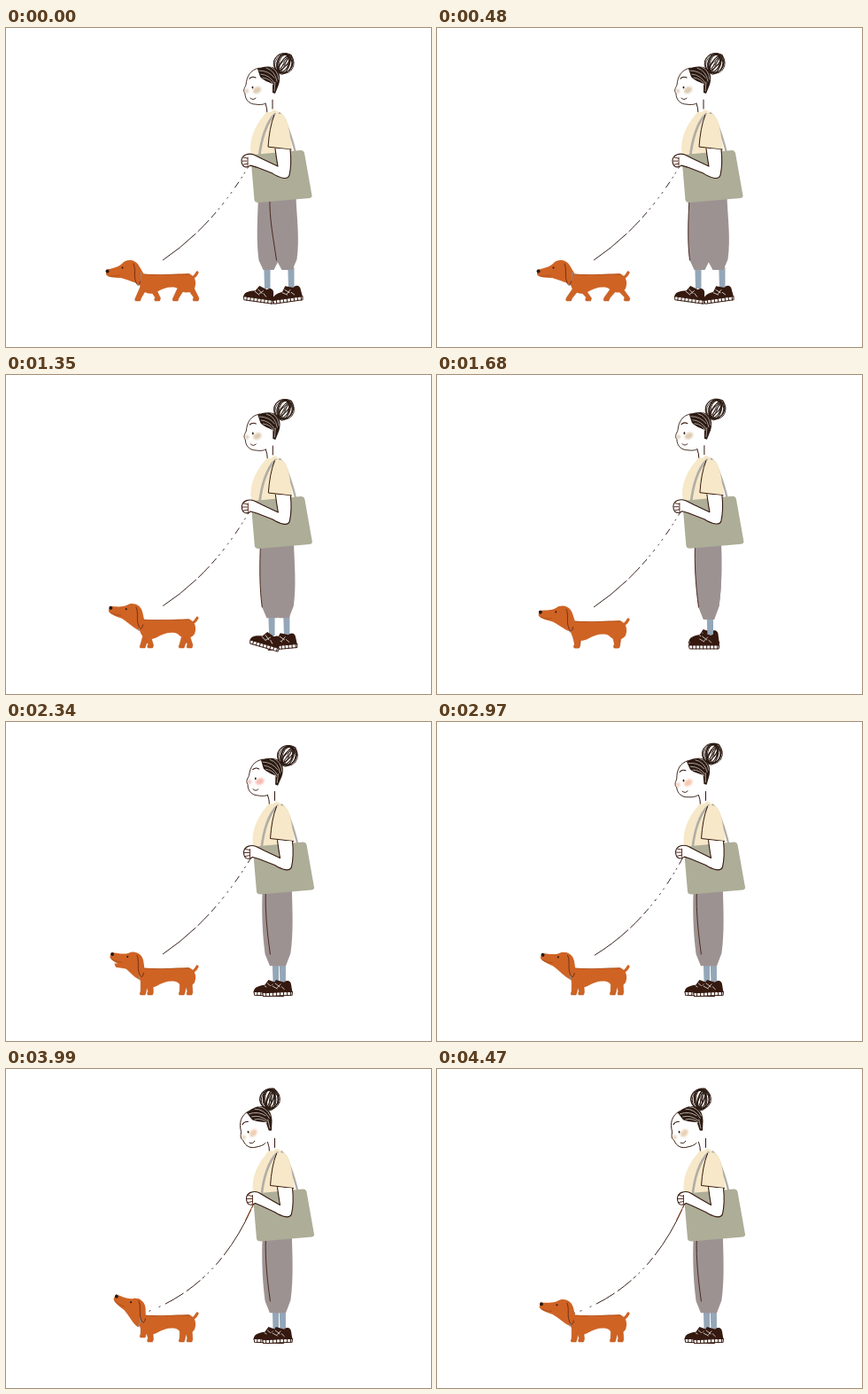
An HTML page with a canvas that plays this animation: 480 by 360 pixels, repeating every 4.5 s.

```html
<!DOCTYPE html>
<html lang="en">
<head>
<meta charset="utf-8">
<title>Walking the dog</title>
<style>
html, body { margin: 0; width: 100%; height: 100%; overflow: hidden; background: #fff; }
canvas { display: block; }
</style>
</head>
<body>
<canvas id="stage" width="480" height="360"></canvas>
<script>
const ctx = document.getElementById('stage').getContext('2d');
const LOOP = 4500, TICK = 30, STRIDE = 960, STOP = 1750;
const INK = '#35190f', HAIR = '#2b1a12', SKIN = '#fff', SHIRT = '#f6e8c8', BAG = '#adad98',
  STRAP = '#b1ada7', PANTS = '#9d9292', SOCK = '#94a7b8', FUR = '#cf6324', FUR_INK = '#6b2a10';

const lerp = (a, b, k) => a + (b - a) * k;
const ease = (t, from, to) => {
  const k = Math.min(1, Math.max(0, (t - from) / (to - from)));
  return k * k * (3 - 2 * k);
};
// Eased value through [time, value] pairs
function keyed(t, keys) {
  let value = keys[0][1];
  for (let i = 1; i < keys.length; i++)
    value = lerp(value, keys[i][1], ease(t, keys[i - 1][0], keys[i][0]));
  return value;
}
function shape(path, fill, stroke, width = 1) {
  const p = new Path2D(path);
  if (fill) { ctx.fillStyle = fill; ctx.fill(p); }
  if (stroke) { ctx.strokeStyle = stroke; ctx.lineWidth = width; ctx.stroke(p); }
}
const line = (path, color = INK, width = 1) => shape(path, null, color, width);
function oval(x, y, rx, ry, fill, angle = 0) {
  ctx.beginPath();
  ctx.ellipse(x, y, rx, ry, angle, 0, 7);
  ctx.fillStyle = fill;
  ctx.fill();
}
function group(x, y, degrees, px, py, draw) {
  ctx.save();
  ctx.translate(px + x, py + y);
  ctx.rotate(degrees * Math.PI / 180);
  ctx.translate(-px, -py);
  draw();
  ctx.restore();
}

function shoe(x, y, degrees) {
  group(x, y, degrees, 0, 0, () => {
    shape('M-17-3C-18-9-11-11-5-12L-1-18L8-15C11-18 16-17 16-11L17-3Z', INK);
    shape('M-17-4L17-4L16.5 0L-16 0Z', SKIN, INK);
    for (let i = -13; i < 16; i += 4) line(`M${i}-4V0`);
    line('M-5-11L0-8M-2-14L3-10M4-13L0-9M5-10L8-7', '#e9e2dc', .8);
  });
}

// d: -1 leg in front, +1 leg behind
function leg(d, lift, seam) {
  const hip = 306 + 6.5 * d, knee = 307 + 10 * d, hem = 307 + 10.5 * d, y = 276 - 3 * Math.abs(d);
  const ankle = 308.5 + 13.5 * d;
  shape(`M${ankle - 3.7} ${y - 3}L${ankle - 3} 294H${ankle + 3.5}L${ankle + 3.5} ${y - 3}Z`, SOCK);
  shoe(301.7 + 17 * d, 309 - lift, -8 * d - 12 * lift * d);
  const front = `M${hip - 14.5} 190C${hip - 15.5} 215 ${knee - 14.5} 240 ${knee - 11.5} 262`;
  shape(`${front}L${hem - 6} ${y}H${hem + 6}L${knee + 11.5} 261C${knee + 15} 238 ${hip + 15.5} 210 ${hip + 15} 190Z`, PANTS);
  if (seam) line(front, '#4a2a20');
}

// Loose strands wound around the bun
function bun(x, y) {
  oval(x, y, 11, 11.5, '#fff');
  for (let i = 0; i < 13; i++) {
    ctx.beginPath();
    ctx.ellipse(x + Math.sin(i * 5), y + Math.cos(i * 3), 1 + i * .87, 11.7 - i % 3 * .7, .45 + .3 * Math.sin(i * 7), 0, 7);
    ctx.strokeStyle = HAIR;
    ctx.lineWidth = .9;
    ctx.stroke();
  }
}

function head(blush) {
  shape('M286 45C276 47 272 54 271 64C270 67 267 70 270 74C270 81 275 86 282 86C288 87 294 85 297 80L304 66L300 46Z', SKIN);
  line('M286 45C276 47 272 54 271 64C270 67 267 70 270 74C270 81 275 86 282 86C288 87 291 86 293 85', INK, .9);
  ctx.save();
  ctx.filter = 'blur(1px)';
  oval(283.5, 70, 5, 3.5, blush, -.5);
  oval(272, 71, 2, 2.5, blush);
  ctx.restore();
  line('M275 57Q278 54 282 56', INK, 1.1);
  oval(278.5, 67, .9, 1.4, INK);
  line('M276 79Q279 82 282 79', INK, .9);
  shape('M284 46C290 43 300 42 305 46C310 51 310 58 308 64L304 74L301 73L301 63C296 61 289 58 287 55Z', HAIR);
  line('M286 48Q297 48 303 56M288 52Q298 53 303 62M290 56Q299 57 302 64M294 45Q304 48 306 60M304 61L303 71M299 44Q307 47 308 58', '#d8d0ca', .7);
  bun(314, 40);
}

function torso(tilt, lookUp, blush) {
  shape('M293 82C294 88 295 92 294 97L304 97L302 72Z', SKIN);
  line('M293 85Q295 90 295 96M301 81V91');
  shape('M294 95C286 105 276 118 276 136L278 150H325L323 136C321 120 320 104 312 97L303 92L299 95Z', SHIRT);
  line('M286 146C288 126 294 106 304 97', STRAP, 2.7);
  line('M309 96C317 106 323 124 327 141', STRAP, 2.3);
  shape('M279 143L333 138Q336 138 337 141L345.5 189Q346 191 343 192L285 197Q281 197 280.5 194L276.5 147Q276.5 143 279 143Z', BAG);
  shape('M304 97C299 108 296 120 296 134L322 137C321 118 319 104 311 97Z', SHIRT);
  line('M303 98C299 108 297 120 296 134L322 137');
  const hx = 3 * tilt, hy = -tilt;
  const arm = `M304 136C305 144 306 150 307 156L${290 + hx} 148L${280 + hx} ${143 + hy}`
    + `C${275 + hx} ${141 + hy} ${267 + hx} ${142 + hy} ${266 + hx} ${149 + hy}`
    + `C${266 + hx} ${156 + hy} ${270 + hx} ${159 + hy} ${276 + hx} ${155 + hy}`
    + `L${283 + hx} 157L301 164C309 169 318 172 320 166C322 157 322 146 321 137`;
  shape(arm, SKIN, INK, 1.1);
  line(`M${268 + hx} ${146 + hy}l5 1M${267 + hx} ${150 + hy}l5 0M${268 + hx} ${154 + hy}l5-1M${273 + hx} ${146 + hy}v9`, '#5a2e20');
  group(-tilt, -tilt, 2 * lookUp - 21 * tilt, 298, 90, () => head(blush));
}

function dogLegs(d, paw) {
  const feet = (x, spread, raise) => [1, -1].forEach(side => {
    const foot = x + side * spread, y = 308 - (side < 0 ? raise : 0);
    shape(`M${x + side * 2 - 4.5} 288L${foot - 2.5} ${y - 4}Q${foot - 4.5} ${y} ${foot - 2} ${y}H${foot + 2.5}`
      + `L${foot + 3.5} ${y - 3}L${x + side * 2 + 4.5} 288Z`, FUR, '#b5531b', .5);
  });
  feet(158 + 2 * Math.abs(d), 11 * d, paw);
  feet(203, 11.5 * d, 0);
}

function dog(d, dip, angle, bark, paw) {
  dogLegs(d, paw);
  group(0, dip, 0, 0, 0, () => {
    line('M207 283Q213 282 216 276', FUR, 3.2);
    shape('M150 277C165 279 190 278 206 277C213 279 216 286 213 294C209 300 199 300 194 294'
      + 'C188 291 178 293 170 298C162 302 153 299 151 290Z', FUR);
    line('M153 278C170 279 190 278 207 278', '#a34c1b', .6);
    group(0, 0, angle, 148, 282, () => {
      if (bark > 0) group(0, 0, -18 * bark, 134, 279, () => shape('M120 279L138 277L137 284L122 283Z', FUR));
      shape('M113 273C120 271 127 270 131 266C135 261 145 260 150 268L157 280L154 289'
        + 'C147 289 138 284 130 282C122 282 114 281 113 278Z', FUR);
      oval(114.5, 274.5, 2, 2, HAIR);
      oval(131.5, 270.5, 1, 1.1, HAIR);
      line('M116 280Q123 281 128 279', '#a34c1b', .7);
    });
    line('M153 276Q152 284 150 290', '#8c8b8a', 1.3);
    group(angle * .17, -angle * .12, 0, 0, 0, () => {
      shape('M139 264C147 261 151 270 151.5 279C153 289 149 293 146.5 286C145 279 146 270 139 264Z', FUR);
      line('M144 266C147 272 144 280 146.5 286C148 292 151 291 151.5 286', FUR_INK, .9);
    });
  });
}

const SLACK_DASH = [2, 6, 2, 10, 2, 6, 24, 4, 20, 3, 4, 4, 2, 5, 2, 5, 10, 4, 60];
const TAUT_DASH = [0, 27, 48, 3, 18, 4, 8, 4, 2, 5, 3, 6, 2, 5, 2, 6, 8, 5, 2, 4, 2, 5, 9, 200];
function leash(handX, handY, dip, slack) {
  ctx.setLineDash(slack > .5 ? SLACK_DASH : TAUT_DASH);
  line(`M154 ${276 + dip}Q${lerp(226, 239, slack)} ${lerp(237, 247, slack)} ${handX} ${handY}`, '#2c1710', .95);
  ctx.setLineDash([]);
  if (slack > .5) line(`M${handX} ${handY}l-9 18`, '#9a4a28');
}

function render(t) {
  const phase = Math.min(t, STOP) / STRIDE;
  const stride = Math.abs((phase % 1) * 4 - 2) - 1;
  const swing = (phase % 1) < .5;
  const turn = phase * 4 * Math.PI;
  const stand = ease(t, 1680, 2100);
  const tilt = ease(t, 2800, 3220);

  const bodyX = lerp(.9 * (1 - Math.abs(stride)), 2.5, stand);
  const bodyY = lerp(Math.cos(turn - .8) - .6, -2.5, stand);
  const rgb = [0, 1, 2].map(i => Math.round(keyed(t, [
    [1700, [222, 203, 178][i]], [2300, [247, 186, 178][i]],
    [3300, [247, 203, 178][i]], [4400, [232, 208, 180][i]]])));

  const walkNod = 6 - 6 * Math.cos(turn) - 15 * Math.sin(turn);
  const nod = t < 1680 ? walkNod
    : keyed(t, [[1680, 12], [2100, 23], [2400, 23], [2700, 9], [3260, 35], [4320, 35], [4500, 15]]);
  const dip = t < 1680 ? 2 * Math.sin(turn) : 0;
  const bark = ease(t, 2200, 2300) * (1 - ease(t, 2400, 2500));
  const paw = 5 * ease(t, 3000, 3250) * (1 - ease(t, 4250, 4420));

  ctx.fillStyle = '#fff';
  ctx.fillRect(0, 0, 480, 360);
  ctx.lineCap = ctx.lineJoin = 'round';
  const lift = 4 * (1 - Math.abs(stride)) * (1 - stand);
  leg(-stride, swing ? 0 : lift, false);
  leg(stride, swing ? lift : 0, true);
  ctx.lineCap = 'butt';
  leash(274 + bodyX + 3 * tilt, 156 + bodyY - tilt, dip, tilt);
  ctx.lineCap = 'round';
  group(bodyX, bodyY, 0, 0, 0, () => torso(tilt, stand, `rgb(${rgb})`));
  dog(t < STOP ? stride * Math.abs(stride) : lerp(.08, .38, stand), dip, nod, bark, paw);
}

const start = performance.now();
(function tick() {
  const t = (performance.now() - start) % LOOP;
  render(Math.floor(t / TICK) * TICK);
  requestAnimationFrame(tick);
})();
</script>
</body>
</html>
```
